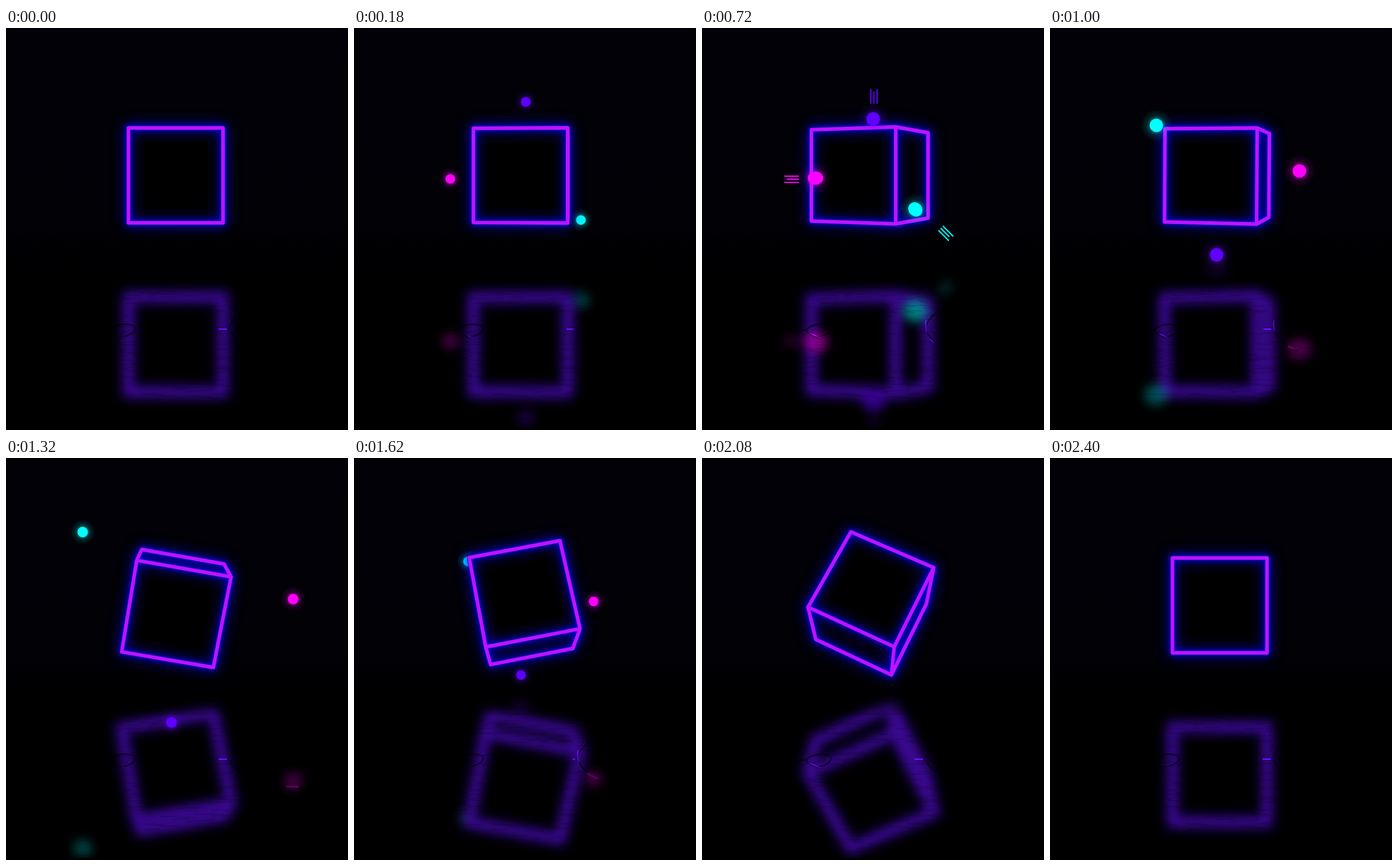
These frames come from a looping animation (486x570 px, 2420 ms). An HTML page with a canvas:

```html
<!DOCTYPE html>
<html lang="en">
<head>
<meta charset="utf-8">
<title>Neon cube</title>
<style>
html, body { margin: 0; width: 100%; height: 100%; overflow: hidden; background: #000; }
canvas { display: block; width: 486px; height: 570px; }
</style>
</head>
<body>
<canvas id="stage" width="486" height="570"></canvas>
<script>
const W = 486, H = 570, LOOP = 2420, STEP = 20;
const CX = 241.2, CY = 209, HALF = 62.5, VIEW = 900, MIRROR = 658;
const stage = document.getElementById('stage').getContext('2d');
const glow = layer(), floor = layer();

// Motion tracks: [time, value] pairs
const YAW = [[0, 0], [360, 11.5], [720, 24.5], [800, 25.5], [1180, 0]];
const TILT = [[960, 0], [1320, -11.5], [1620, 15.7], [2080, 22.8], [2130, 23.6], [2400, 0]];
const ROLL = [[960, 0], [1320, 10], [1620, -11.2], [2080, 26], [2130, 27], [2400, 0]];
const TRAVEL = [[0, .5], [300, 0], [500, 0], [540, .02], [720, .25], [1080, .927],
  [1320, 1], [1620, .795], [1760, .5]];
const RADIUS = [[0, 6.3], [360, 7.5], [560, 7.7], [720, 9.6], [860, 10], [1320, 7.5], [1620, 6.8], [1760, 6.3]];
const STRETCH = [[560, 0], [720, 1], [860, 1], [1040, 0]];
const TRAIL = [[620, 0], [690, 1], [740, 1], [840, 0]];

const ORBS = [
  { from: [246, 47], to: [235, 375], rgb: '96,0,255', lag: 32, angle: Math.PI / 2, squash: .02 },
  { from: [79, 217], to: [408, 200], rgb: '255,0,255', lag: 34, angle: 0, squash: .14 },
  { from: [368, 308], to: [109, 105], rgb: '0,255,255', lag: 55, angle: -Math.PI * 3 / 4, squash: .12 }
];

const CORNERS = [];
for (const z of [1, -1]) for (const [x, y] of [[-1, -1], [1, -1], [1, 1], [-1, 1]]) CORNERS.push([x, y, z]);
const FACES = [[0, 1, 2, 3], [5, 4, 7, 6], [1, 5, 6, 2], [4, 0, 3, 7], [4, 5, 1, 0], [3, 2, 6, 7]];

const streaks = makeStreaks();

function layer() {
  const c = document.createElement('canvas');
  c.width = W;
  c.height = H;
  return c.getContext('2d');
}

// Monotone cubic through the keys, flat at both ends
function track(keys, t) {
  const last = keys.length - 1;
  if (t <= keys[0][0]) return keys[0][1];
  if (t >= keys[last][0]) return keys[last][1];
  const slope = i => (keys[i + 1][1] - keys[i][1]) / (keys[i + 1][0] - keys[i][0]);
  const tangent = i => {
    if (i === 0 || i === last) return 0;
    const a = slope(i - 1), b = slope(i);
    return a * b <= 0 ? 0 : 2 * a * b / (a + b);
  };
  let i = 0;
  while (t >= keys[i + 1][0]) i++;
  const span = keys[i + 1][0] - keys[i][0], u = (t - keys[i][0]) / span, v = 1 - u;
  return keys[i][1] * (1 + 2 * u) * v * v + keys[i + 1][1] * (3 - 2 * u) * u * u
    + span * u * v * (tangent(i) * v - tangent(i + 1) * u);
}

function spin(a, b, degrees) {
  const r = degrees * Math.PI / 180, c = Math.cos(r), s = Math.sin(r);
  return [a * c - b * s, a * s + b * c];
}

function visibleFaces(t) {
  const yaw = track(YAW, t), tilt = track(TILT, t), roll = track(ROLL, t);
  const points = CORNERS.map(([x, y, z]) => {
    [x, y] = spin(x, y, roll);
    [x, z] = spin(x, z, yaw);
    [y, z] = spin(y, z, tilt);
    const k = HALF / (1 - z * HALF / VIEW);
    return [CX + x * k, CY + y * k];
  });
  return FACES.map(f => f.map(i => points[i])).filter(([a, b, c]) =>
    (b[0] - a[0]) * (c[1] - b[1]) - (b[1] - a[1]) * (c[0] - b[0]) > 0);
}

function facePath(faces) {
  const path = new Path2D();
  for (const face of faces) {
    face.forEach(([x, y], i) => i ? path.lineTo(x, y) : path.moveTo(x, y));
    path.closePath();
  }
  return path;
}

function drawCube(g, path, soft) {
  g.save();
  g.lineJoin = 'round';
  g.fillStyle = '#000';
  g.fill(path);
  if (soft) {
    g.strokeStyle = 'rgba(40,0,190,.22)';
    g.lineWidth = 34;
    g.stroke(path);
    g.strokeStyle = 'rgb(96,14,240)';
    g.lineWidth = 15;
    g.stroke(path);
  } else {
    g.shadowColor = '#00f';
    g.strokeStyle = '#1600e0';
    g.lineWidth = 6;
    for (const blur of [20, 9]) {
      g.shadowBlur = blur;
      g.stroke(path);
    }
    g.shadowBlur = 0;
    g.strokeStyle = '#be14fa';
    g.lineWidth = 5;
    g.stroke(path);
  }
  g.restore();
}

function drawOrb(g, orb, t, soft) {
  const u = track(TRAVEL, t), speed = track(STRETCH, t), r = track(RADIUS, t);
  const [x, y] = orb.from.map((a, i) => a + (orb.to[i] - a) * u);
  g.save();
  g.translate(x, y);
  if (soft) {
    g.globalAlpha = .42 + .4 * speed;
    g.fillStyle = `rgb(${orb.rgb})`;
    g.beginPath();
    g.ellipse(0, 0, r * 1.8, r * 1.6, 0, 0, 7);
    g.fill();
  } else {
    const halo = g.createRadialGradient(0, 0, r * .8, 0, 0, r * 2.4);
    halo.addColorStop(0, `rgba(${orb.rgb},.42)`);
    halo.addColorStop(.4, `rgba(${orb.rgb},.14)`);
    halo.addColorStop(1, `rgba(${orb.rgb},0)`);
    g.fillStyle = halo;
    g.fillRect(-30, -30, 60, 60);
    g.rotate(orb.angle);
    g.fillStyle = `rgb(${orb.rgb})`;
    g.beginPath();
    g.ellipse(0, 0, r * (1 + orb.squash * speed), r, 0, 0, 7);
    g.fill();
    g.rotate(-orb.angle);
  }
  drawTrail(g, orb, track(TRAIL, t), soft);
  g.restore();
}

function drawTrail(g, orb, size, soft) {
  if (size <= 0) return;
  const dx = orb.to[0] - orb.from[0], dy = orb.to[1] - orb.from[1], d = Math.hypot(dx, dy);
  g.translate(-dx / d * orb.lag, -dy / d * orb.lag);
  g.rotate(orb.angle);
  g.globalAlpha = soft ? .25 : 1;
  g.strokeStyle = `rgb(${orb.rgb})`;
  g.lineWidth = soft ? 6 : 1.8;
  g.beginPath();
  for (const side of [-1, 0, 1]) {
    g.moveTo((side ? -10.5 : -7) * size, side * 4.4);
    g.lineTo(10.5 * size, side * 4.4);
  }
  g.stroke();
}

function drawScene(g, t, path, soft) {
  const shown = t > 60 && t < 1740, inFront = t > 480 && t < 1240;
  const orbs = () => ORBS.forEach(orb => drawOrb(g, orb, t, soft));
  if (shown && !inFront) orbs();
  drawCube(g, path, soft);
  if (shown && inFront) orbs();
}

// Wet floor: short horizontal dark strokes
function makeStreaks() {
  const path = new Path2D();
  let seed = 7;
  const random = () => (seed = seed * 16807 % 2147483647) / 2147483647;
  for (let i = 0; i < 520; i++) {
    const x = 40 + random() * 400, y = 345 + random() * 220, length = 6 + random() * 26;
    path.moveTo(x, y);
    path.quadraticCurveTo(x + length / 2, y + random() * 4 - 2, x + length, y + random() * 2 - 1);
  }
  return path;
}

const cracks = new Path2D('M412 379Q362 384 340 398Q318 414 317 427Q328 449 352 458M108 428Q130 431 148 428'
  + 'Q160 416 182 422Q188 432 166 438Q152 437 148 428');
const glints = new Path2D('M318 414Q315 425 320 435Q318 425 319 414ZM322 440Q336 448 350 456Q338 456 322 440Z'
  + 'M302 426H314V428H302ZM68 438Q78 444 91 443Q78 446 68 438ZM150 432Q160 434 170 440Q159 437 150 432Z'
  + 'M394 465H416V467H394Z');

function drawFloor(t, path) {
  glow.clearRect(0, 0, W, H);
  glow.save();
  glow.transform(1, 0, 0, -1, 0, MIRROR);
  drawScene(glow, t, path, true);
  glow.restore();

  floor.clearRect(0, 0, W, H);
  floor.save();
  floor.globalAlpha = .6;
  floor.filter = 'blur(7px)';
  floor.drawImage(glow.canvas, 0, 0);
  floor.filter = 'none';
  floor.globalAlpha = 1;
  floor.globalCompositeOperation = 'destination-out';
  floor.strokeStyle = 'rgba(0,0,0,.17)';
  floor.lineWidth = 1.5;
  floor.stroke(streaks);
  floor.strokeStyle = 'rgba(0,0,0,.6)';
  floor.lineWidth = 1.8;
  floor.stroke(cracks);
  const fade = floor.createLinearGradient(0, 325, 0, 368);
  fade.addColorStop(0, '#000');
  fade.addColorStop(1, 'rgba(0,0,0,0)');
  floor.fillStyle = fade;
  floor.fillRect(0, 0, W, 368);
  floor.restore();

  stage.save();
  stage.globalCompositeOperation = 'lighter';
  stage.drawImage(floor.canvas, 0, 0);
  stage.clip(glints);
  stage.globalAlpha = .6;
  stage.drawImage(glow.canvas, 0, 0);
  stage.restore();
}

function drawBackdrop() {
  const sky = stage.createLinearGradient(0, 0, 0, H);
  sky.addColorStop(0, '#010107');
  sky.addColorStop(.5, '#010106');
  sky.addColorStop(.62, '#000');
  stage.fillStyle = sky;
  stage.fillRect(0, 0, W, H);
}

function frame(now) {
  const t = Math.floor((now - start) % LOOP / STEP) * STEP;
  const path = facePath(visibleFaces(t));
  drawBackdrop();
  drawFloor(t, path);
  drawScene(stage, t, path, false);
  stage.fillStyle = '#000';
  stage.fillRect(0, 567, W, 3);
  requestAnimationFrame(() => frame(performance.now()));
}

const start = performance.now();
frame(start);
</script>
</body>
</html>
```
